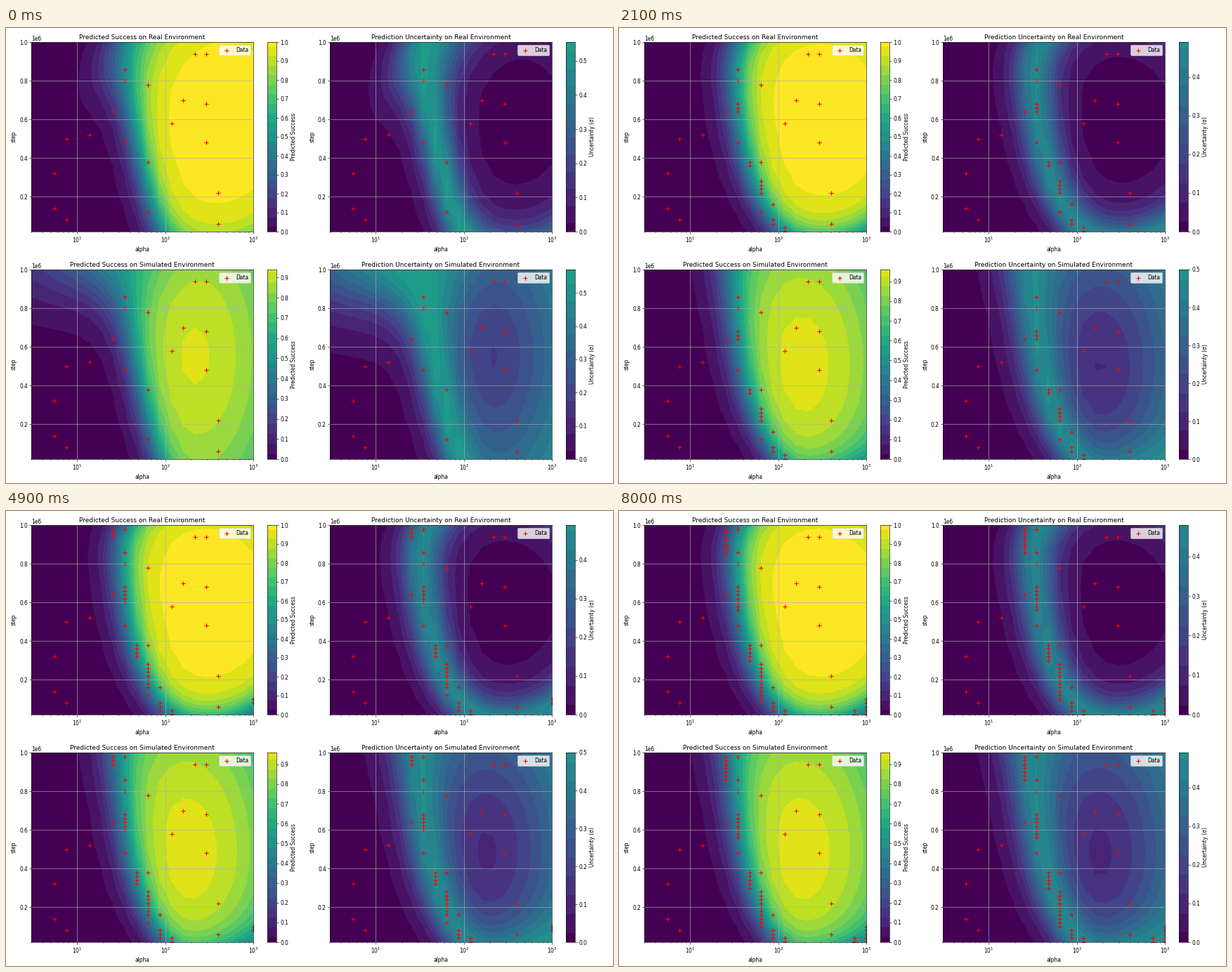
Recreate the animation shown at these times as a matplotlib script. Size 864 px wide and 648 px high, loop 8.1 s.

```python
import numpy as np
import matplotlib.pyplot as plt
from matplotlib.animation import FuncAnimation
from matplotlib.ticker import MultipleLocator

W, H, FRAMES, INTERVAL = 864, 648, 81, 100
PANEL_W, PANEL_H = 316, 270

# Sampling grid: 20 log-spaced alphas, 50 evenly spaced steps
alphas = np.geomspace(3, 1000, 20)
steps = np.arange(1, 51) * 2e4
X, Y = np.meshgrid(np.linspace(0, PANEL_W, 20), np.linspace(PANEL_H, 0, 50))
DEPTH = Y / PANEL_H

LEVELS = np.r_[0, np.arange(20) * 0.05 + 0.025, 1.0001]
COLORS = plt.get_cmap("viridis")(np.linspace(0, 1, 21))

# First samples: alpha index -> step indices
SEEDS = {2: [16, 7], 3: [25, 4], 5: [26], 7: [32], 8: [43, 40, 24],
         10: [39, 19, 6], 12: [29], 13: [35], 14: [47], 15: [47, 34, 24],
         16: [11, 3]}

# Later samples fill columns downwards: alpha index, steps, frames
RUNS = [(11, (8, 8), (3, 3)), (12, (2, 1), (5, 8)), (11, (4, 2), (12, 28)),
        (10, (14, 5), (10, 75)), (8, (34, 28), (12, 78)),
        (9, (19, 15), (14, 60)), (8, (49, 49), (25, 25)),
        (7, (49, 43), (45, 66)), (19, (5, 1), (45, 62)),
        (18, (2, 1), (70, 78))]


def build_samples():
    rows = [(alphas[i], n * 2e4, 0) for i, ns in SEEDS.items() for n in ns]
    for i, (high, low), (start, end) in RUNS:
        for n in range(high, low - 1, -1):
            done = (high - n) / max(high - low, 1)
            rows.append((alphas[i], n * 2e4, start + (end - start) * done**2))
    return np.array(rows)


SAMPLES = build_samples()


def mix(a, b, t):
    return a + (b - a) * t


def settle(frame):
    """Progress of the fit: quick at first, then ever slower."""
    return 1 - np.exp(-frame / 15)


def sigmoid(z):
    return 1 / (1 + np.exp(-z))


def soft_min(a, b):
    return -np.logaddexp(-a, -b)


def front(frame):
    """Log-odds rising from left to right across a leaning edge."""
    t = min(frame / 9, 1)
    early = 126 + 45 * DEPTH + 12 * DEPTH**4
    late = 120 + 32 * DEPTH + 38 * DEPTH**4
    width = mix(11 + 16 * (1 - DEPTH)**5, 12 + 2.5 * (1 - DEPTH)**3, t)
    lift = -0.8 + 0.006 * X - Y / 28 - 9 * t
    return np.logaddexp((X - mix(early, late, t)) / width, lift)


def real_success(frame):
    t = settle(frame)
    dx, dy = X - mix(262, 247, t), Y - 111
    dome = (mix(5.7, 6, t) - mix(2.3e-4, 2.8e-4, t) * dx**2
            - mix(1.45e-4, 2.1e-4, t) * dy**2)
    return sigmoid(soft_min(front(frame), dome))


def sim_success(frame):
    t = settle(frame)
    dx = (X - mix(231, 219, t)) / mix(27, 34.5, t)
    dy = (Y - mix(123, 148, t)) / mix(52, 63, t)
    dome = mix(2.66, 3.05, t) - mix(0.5, 0.8, t) * (np.hypot(1, np.hypot(dx, dy)) - 1)
    dome -= 0.85 * t * np.exp((DEPTH - 1) / 0.12) * (0.5 + X / PANEL_W)
    return sigmoid(soft_min(front(frame), dome))


def scale_top(offset, frame):
    top = 0.495 + offset - 0.0002 * frame + 0.06 * np.exp(-frame / 4)
    unit = 0.015 if top > 0.515 else 0.01
    return round(top / unit) * unit


def spread(p, top, power):
    return (top - 0.008) * (4 * p * (1 - p))**power


fig = plt.figure(figsize=(16, 12), dpi=54)


def add_axes(x, y, w, h):
    return fig.add_axes([x / W, 1 - (y + h) / H, w / W, h / H])


class Panel:
    def __init__(self, x, y, title, label):
        self.ax = ax = add_axes(x, y, PANEL_W, PANEL_H)
        ax.set_xscale("log")
        ax.set(xlim=(3, 1000), ylim=(2e4, 1e6), title=title,
               xlabel="alpha", ylabel="step")
        ax.grid(True)
        self.dots = ax.scatter([], [], s=45, c="red", marker="+", label="Data")
        ax.legend(loc="upper right")
        self.fill = None

        self.bar = bar = add_axes(x + 335.75, y, 13.5, PANEL_H)
        bar.pcolormesh([0, 1], LEVELS, np.arange(21)[:, None], cmap="viridis",
                       vmin=0, vmax=20)
        bar.set(xlim=(0, 1), xticks=[], ylabel=label)
        bar.yaxis.tick_right()
        bar.yaxis.set_label_position("right")
        bar.yaxis.set_major_locator(MultipleLocator(0.1))

    def show(self, values, samples, top):
        if self.fill is not None:
            self.fill.remove()
        self.fill = self.ax.contourf(alphas, steps, values, levels=LEVELS,
                                     colors=COLORS, zorder=0.5)
        self.ax.set(xlim=(3, 1000), ylim=(2e4, 1e6))
        self.dots.set_offsets(samples)
        self.bar.set_ylim(0, top)


panels = []
for y, place in [(20, "Real"), (344, "Simulated")]:
    panels += [
        Panel(36, y, f"Predicted Success on {place} Environment",
              "Predicted Success"),
        Panel(461, y, f"Prediction Uncertainty on {place} Environment",
              "Uncertainty (σ)"),
    ]


def update(frame):
    samples = SAMPLES[SAMPLES[:, 2] <= frame, :2]
    real, sim = real_success(frame), sim_success(frame)
    top_real, top_sim = scale_top(0, frame), scale_top(0.012, frame)
    fields = [
        (real, 1),
        (spread(real, top_real, 1), top_real),
        (sim, 0.94 if frame < 15 else 0.96),
        (spread(sim, top_sim, 0.85), top_sim),
    ]
    for panel, (values, top) in zip(panels, fields):
        panel.show(values, samples, top)
    return []


anim = FuncAnimation(fig, update, frames=FRAMES, interval=INTERVAL,
                     repeat=True, repeat_delay=0, blit=False)
plt.show()
```
